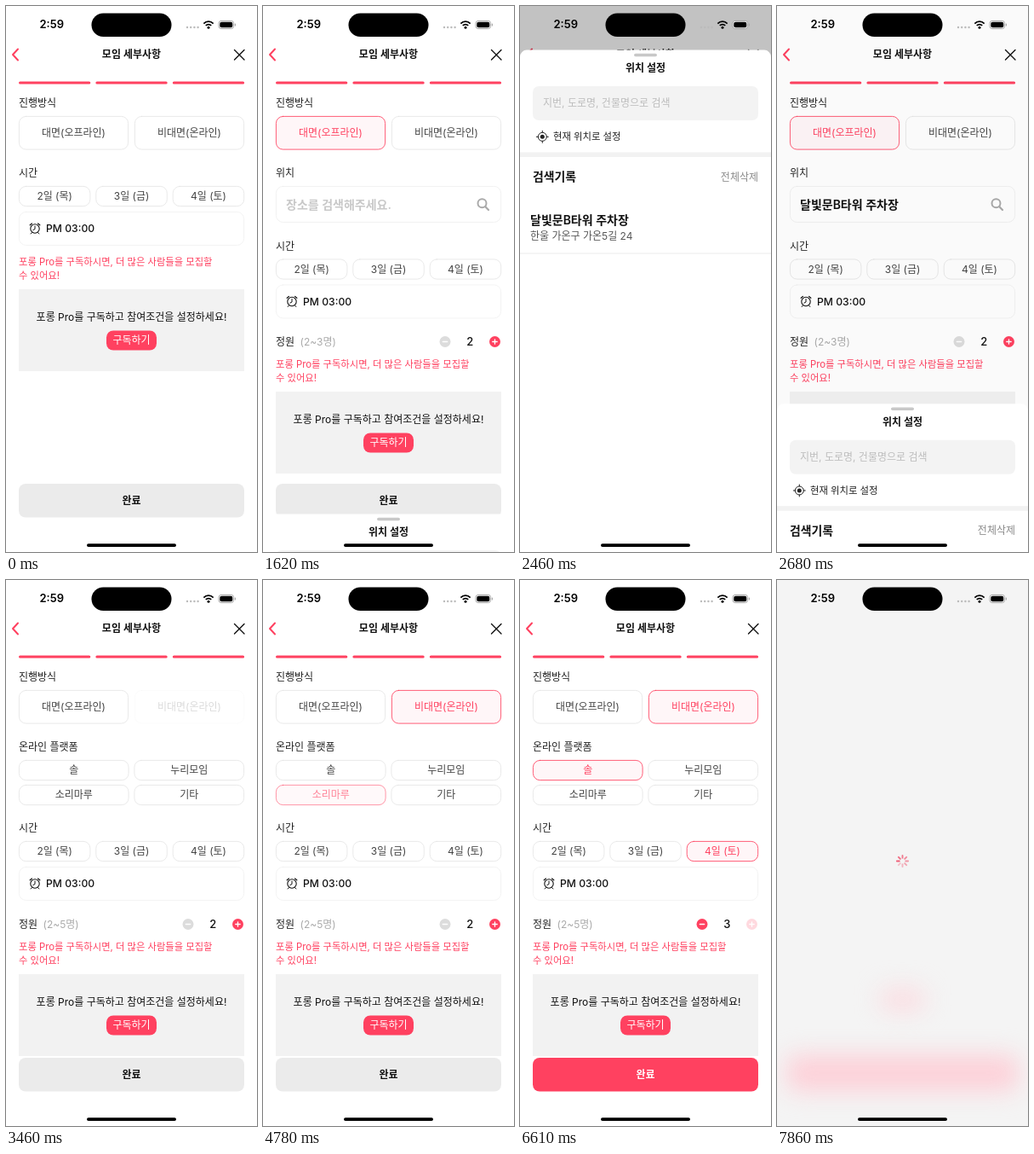
These frames come from a looping animation (295x640 px, 8 s). An HTML page with a canvas:

```html
<!DOCTYPE html>
<html lang="ko">
<head>
<meta charset="utf-8">
<title>모임 세부사항</title>
<style>
html, body { margin: 0; width: 100%; height: 100%; overflow: hidden; background: #fff; }
canvas { display: block; width: 295px; height: 640px; }
</style>
</head>
<body>
<canvas id="stage"></canvas>
<script>
const W = 295, H = 640, LOOP = 8000;
const RED = '#ff4160', INK = '#111', GREY = '#444', LINE = '#e6e6e6';
const FONT = 'Inter, "Noto Sans CJK KR", "Noto Sans CJK", sans-serif';
const BOLD = 600;
const NEVER = Infinity;

const canvas = document.getElementById('stage');
const ctx = canvas.getContext('2d');
const dpr = window.devicePixelRatio || 1;
canvas.width = W * dpr;
canvas.height = H * dpr;

// Screen updates come in bursts: [first, last, count]
const BURSTS = [
  [790, 1230, 5], [1510, 2060, 6], [2460, 3000, 6], [3460, 3910, 5],
  [4130, 4880, 8], [4980, 4980, 1], [5270, 5710, 5], [5930, 6370, 5],
  [6610, 7260, 7], [7460, 7460, 1], [7710, 7710, 1], [7860, 7860, 1]
];
const TAP = {
  offline: 790, sheet: 1588, close: 2500, online: 3460, second: 4130,
  third: 4559, first: 5270, date: 5930, plus: 6610, plusAgain: 7043,
  done: 7710, loading: 7860
};

let now = 0;

function snap(t) {
  let s = 0;
  for (const [a, b, n] of BURSTS) {
    if (t < a) break;
    const step = n > 1 ? (b - a) / (n - 1) : 1;
    s = a + step * Math.min(n - 1, Math.floor((t - a) / step + 1e-6));
  }
  return s;
}

function fade(tap) {
  if (now < tap) return 1;
  const x = Math.min(1, (now - tap) / 400);
  return 0.2 + 0.8 * x * x * (3 - 2 * x);
}

function spring(start) {
  const x = Math.max(0, now - start) * 0.014;
  const p = 1 - (1 + x) * Math.exp(-x);
  return p > 0.98 ? 1 : p;
}

function text(str, x, y, size = 12, color = INK, weight = 400, align = 'left') {
  ctx.font = `${weight} ${size}px ${FONT}`;
  ctx.textAlign = align;
  ctx.textBaseline = 'middle';
  ctx.fillStyle = color;
  ctx.fillText(str, x, y + 0.7);
}

function box(x, y, w, h, r, fill, stroke) {
  ctx.beginPath();
  ctx.roundRect(x, y, w, h, r);
  if (fill) { ctx.fillStyle = fill; ctx.fill(); }
  if (stroke) { ctx.strokeStyle = stroke; ctx.lineWidth = 0.85; ctx.stroke(); }
}

function path(points, color, width) {
  ctx.beginPath();
  points.forEach(([x, y], i) => i ? ctx.lineTo(x, y) : ctx.moveTo(x, y));
  ctx.strokeStyle = color;
  ctx.lineWidth = width;
  ctx.lineCap = ctx.lineJoin = 'round';
  ctx.stroke();
}

function arc(x, y, r, color, width, a = 0, b = Math.PI * 2) {
  ctx.beginPath();
  ctx.arc(x, y, r, a, b);
  ctx.strokeStyle = color;
  ctx.lineWidth = width;
  ctx.lineCap = 'butt';
  ctx.stroke();
}

function disc(x, y, r, color) {
  ctx.beginPath();
  ctx.arc(x, y, r, 0, Math.PI * 2);
  ctx.fillStyle = color;
  ctx.fill();
}

function withAlpha(alpha, draw) {
  ctx.save();
  ctx.globalAlpha *= alpha;
  draw();
  ctx.restore();
}

function chip(label, x, y, w, h, on = NEVER, off = NEVER) {
  const active = now > on && now < off;
  withAlpha(now < off ? fade(on) : 1, () => {
    box(x + 0.4, y + 0.4, w - 0.8, h - 0.8, 8, active ? '#fff6f8' : '#fff', active ? RED : LINE);
    text(label, x + w / 2, y + h / 2, 12, active ? RED : GREY, 400, 'center');
  });
}

function statusBar() {
  text('2:59', 39.5, 21.5, 13, '#000', BOLD);
  box(100.5, 8.5, 94, 27.6, 13.8, '#000');
  for (let i = 0; i < 4; i++) disc(213 + i * 4.2, 25, 1.2, '#bbb');
  for (const r of [4.6, 8]) arc(238, 26.2, r, '#000', 1.7, -Math.PI * 0.75, -Math.PI * 0.25);
  disc(238, 25.3, 1.5, '#000');
  box(250, 17.4, 17.6, 9.2, 3, '#fff', '#999');
  box(251.3, 18.7, 15, 6.6, 2, '#000');
  box(268.8, 20.5, 1.2, 3, 0.6, '#aaa');
}

function header() {
  path([[14, 50.5], [8, 57], [14, 63.5]], RED, 2);
  text('모임 세부사항', 147.5, 57, 12, INK, BOLD, 'center');
  path([[268.5, 51.5], [280, 63]], INK, 1.4);
  path([[280, 51.5], [268.5, 63]], INK, 1.4);
  for (let i = 0; i < 3; i++) box(15 + i * 90.4, 88.5, 84.3, 3, 1.5, RED);
}

function place() {
  text('위치', 15, 196, 12, '#222');
  box(15.4, 211.4, 264.2, 42, 8, '#fff', '#efefef');
  if (now < 2600) text('장소를 검색해주세요.', 27, 233, 14, '#c8c8c8', BOLD);
  else text('달빛문B타워 주차장', 27, 233, 14, INK, BOLD);
  arc(257.5, 231.3, 5, '#aaa', 2);
  path([[261.3, 235.2], [265, 239]], '#aaa', 2.2);
}

function platforms() {
  text('온라인 플랫폼', 15, 196, 12, '#222');
  chip('솔', 15, 211, 129.5, 24, TAP.first);
  chip('누리모임', 150.5, 211, 129.5, 24, TAP.second, TAP.third);
  chip('소리마루', 15, 240, 129.5, 24, TAP.third, TAP.first);
  chip('기타', 150.5, 240, 129.5, 24);
}

function schedule(dy) {
  text('시간', 15, 196 + dy, 12, '#222');
  ['2일 (목)', '3일 (금)', '4일 (토)'].forEach((d, i) =>
    chip(d, 15 + i * 90.4, 211 + dy, 84.3, 24, i === 2 ? TAP.date : NEVER));
  box(15.4, 241.4 + dy, 264.2, 39, 8, null, '#f1f1f1');
  const y = 261 + dy;
  arc(34, y, 5.2, INK, 1.1);
  path([[34, y - 3], [34, y + 0.5], [31.8, y + 1.6]], INK, 1);
  path([[28.2, y - 4.2], [30.4, y - 6]], INK, 1.2);
  path([[39.8, y - 4.2], [37.6, y - 6]], INK, 1.2);
  path([[30.3, y + 4.6], [29.2, y + 6]], INK, 1);
  path([[37.7, y + 4.6], [38.8, y + 6]], INK, 1);
  text('PM 03:00', 47, y - 0.3, 12.2, INK, 500);
}

function capacity(y, online) {
  const count = now >= TAP.plusAgain ? 4 : now >= TAP.plus ? 3 : 2;
  text('정원', 15, y, 12, '#222', 500);
  text(`(2~${online ? 5 : 3}명)`, 43.5, y, 12, '#aaa');
  disc(214, y, 6.5, count > 2 ? RED : '#dcdcdc');
  path([[211.3, y], [216.7, y]], '#fff', 1.3);
  text(String(count), 243.3, y, 13, INK, 500, 'center');
  withAlpha(fade(now >= TAP.plusAgain ? TAP.plusAgain : TAP.plus), () => disc(272.5, y, 6.5, RED));
  path([[269.8, y], [275.2, y]], '#fff', 1.3);
  path([[272.5, y - 2.7], [272.5, y + 2.7]], '#fff', 1.3);
}

function promo(dy) {
  text('포롱 Pro를 구독하시면, 더 많은 사람들을 모집할', 15, 300 + dy, 11.3, RED);
  text('수 있어요!', 15, 316 + dy, 11.3, RED);
  box(15, 332 + dy, 265, 96, 0, '#f2f2f2');
  text('포롱 Pro를 구독하고 참여조건을 설정하세요!', 147.5, 365 + dy, 12, INK, 400, 'center');
  box(118, 380.5 + dy, 59, 23, 8, RED);
  text('구독하기', 147.5, 392 + dy, 12, '#fff', 400, 'center');
}

function doneButton() {
  const ready = now >= TAP.date;
  withAlpha(now >= TAP.done ? 0.3 : 1, () => {
    box(15, 560, 265, 39.5, 8, ready ? RED : '#ebebeb');
    text('완료', 147.5, 579.7, 12, ready ? '#fff' : INK, BOLD, 'center');
  });
}

function form() {
  const offline = now >= TAP.offline && now < TAP.online;
  const online = now >= TAP.online;
  header();
  text('진행방식', 15, 114, 12, '#222');
  chip('대면(오프라인)', 15, 129, 129, 39.5, TAP.offline, TAP.online);
  chip('비대면(온라인)', 151, 129, 129, 39.5, TAP.online);
  if (offline) place();
  if (online) platforms();
  schedule(offline ? 85.5 : online ? 95 : 0);
  if (offline || online) capacity(online ? 403.5 : 393.5, online);
  promo(offline ? 120 : online ? 130 : 0);
  doneButton();
}

function sheet(p) {
  ctx.fillStyle = `rgba(0,0,0,${0.24 * p * p})`;
  ctx.fillRect(0, 0, W, H);
  ctx.save();
  ctx.translate(0, 588 * (1 - p));
  box(0, 51.6, W, H, [8, 8, 0, 0], '#fff');
  box(134, 55.7, 27, 3.6, 1.8, '#c8c8c8');
  text('위치 설정', 147.5, 73, 12, INK, BOLD, 'center');
  box(15, 94, 265, 40, 7, '#f3f3f3');
  text('지번, 도로명, 건물명으로 검색', 27, 114, 12, '#bdbdbd');
  arc(26.3, 153.3, 5, '#222', 1);
  disc(26.3, 153.3, 2.5, '#222');
  for (let i = 0; i < 4; i++) {
    const c = Math.cos(i * Math.PI / 2), s = Math.sin(i * Math.PI / 2);
    path([[26.3 + 5 * c, 153.3 + 5 * s], [26.3 + 7 * c, 153.3 + 7 * s]], '#222', 1);
  }
  text('현재 위치로 설정', 39, 153, 11.4, '#222', 500);
  ctx.fillStyle = '#f2f2f2';
  ctx.fillRect(0, 171.5, W, 5.5);
  text('검색기록', 15, 200, 13.9, INK, BOLD);
  text('전체삭제', 280, 200.5, 12, '#8a8a8a', 400, 'right');
  text('달빛문B타워 주차장', 12, 251, 14, INK, BOLD);
  text('한울 가온구 가온5길 24', 12, 269.7, 12, '#555');
  ctx.fillStyle = '#ececec';
  ctx.fillRect(0, 289.5, W, 1);
  ctx.restore();
}

function loading() {
  ctx.fillStyle = '#f4f4f4';
  ctx.fillRect(0, 0, W, H);
  ctx.save();
  ctx.filter = `blur(${14 * dpr}px)`;
  box(12, 557, 271, 42, 8, '#fdd0d8');
  box(122, 479, 51, 26, 8, '#fbdce1');
  ctx.restore();
  for (let i = 0; i < 8; i++) {
    const a = Math.PI + i * Math.PI / 4, c = Math.cos(a), s = Math.sin(a);
    withAlpha(1 - i * 0.095, () =>
      path([[147.5 + 3.7 * c, 329.5 + 3.7 * s], [147.5 + 6.6 * c, 329.5 + 6.6 * s]], '#ef5f78', 1.9));
  }
}

function render(t) {
  now = snap(t);
  ctx.setTransform(dpr, 0, 0, dpr, 0, 0);
  ctx.fillStyle = '#fff';
  ctx.fillRect(0, 0, W, H);
  if (now >= TAP.loading) {
    loading();
  } else {
    form();
    const p = spring(TAP.sheet) - spring(TAP.close);
    if (p > 0) sheet(p);
  }
  statusBar();
  box(95, 630.2, 105, 3.8, 1.9, '#000');
}

const start = performance.now();
function tick() {
  render((performance.now() - start) % LOOP);
  requestAnimationFrame(tick);
}
tick();
</script>
</body>
</html>
```
